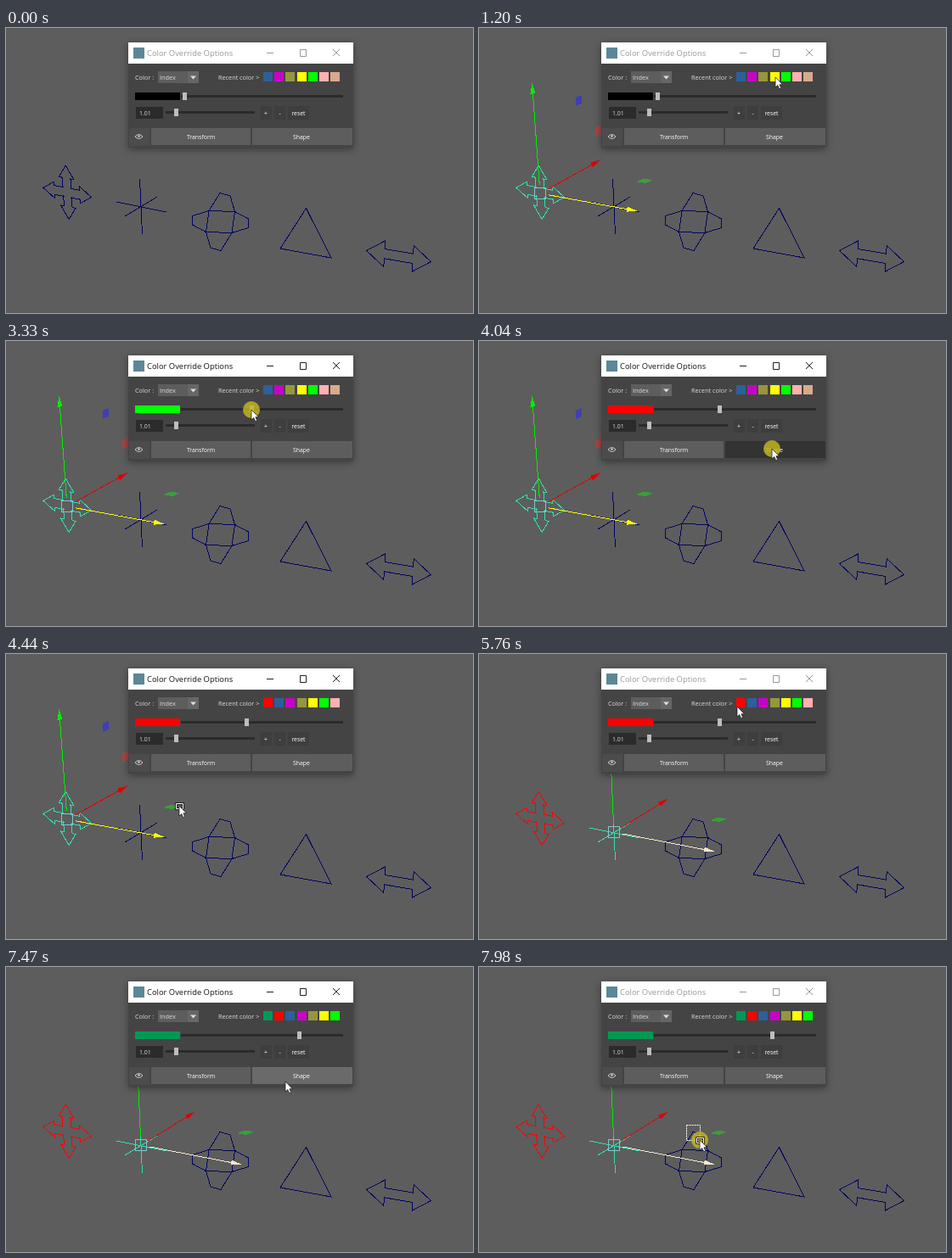
These frames come from a looping animation (550 by 336 pixels, 8 s). An HTML page:

```html
<!DOCTYPE html>
<html lang="en">
<head>
<meta charset="utf-8">
<title>Color Override Options</title>
<style>
html, body { margin: 0; width: 100%; height: 100%; overflow: hidden; background: #5d5d5d; }
svg { display: block; width: 550px; height: 336px; font: 7.3px "Open Sans", "Noto Sans", sans-serif; }
#scene, #win rect { shape-rendering: crispEdges; }
#controls path { fill: none; stroke: #000460; }
#win { filter: drop-shadow(0 2px 4px rgba(0, 0, 0, .4)); }
#win text { fill: #ddd; }
#win #title { font-size: 9.4px; }
#win .mid { text-anchor: middle; font-size: 6.9px; fill: #fff; }
.btn { fill: #5d5d5d; }
.small { fill: #3e3e3e; }
.dark { fill: #2b2b2b; }
.knob { fill: #bdbdbd; }
</style>
</head>
<body>
<svg viewBox="0 0 550 336">
  <rect width="550" height="336" fill="#5d5d5d"/>
  <g id="scene"><g id="controls"></g><g id="gizmo"></g></g>
  <g id="win">
    <rect x="144" y="17" width="265" height="124" fill="#444"/>
    <rect x="144" y="17" width="265" height="25" fill="#fff"/>
    <rect x="150" y="23" width="13" height="13" fill="#5b8798"/>
    <text id="title" x="166" y="33">Color Override Options</text>
    <path id="sysButtons" d="M307 29.500H315M346.500 25.500h7v8h-7zM385 25l8 8m0-8l-8 8" fill="none"/>
    <text x="152" y="61">Color :</text>
    <rect class="btn" x="179" y="51" width="48" height="14"/>
    <rect x="214" y="51" width="13" height="14" fill="#666"/>
    <path d="M217 56.500h7l-3.500 4z" fill="#ddd"/>
    <text x="181" y="61">Index</text>
    <text x="250" y="60.500">Recent color &gt;</text>
    <g id="recent"></g>
    <rect class="dark" x="206" y="79" width="191" height="3"/>
    <rect id="chip" x="152" y="76" width="53" height="9"/>
    <rect id="knob" class="knob" y="76" width="5" height="9"/>
    <rect class="dark" x="153" y="93" width="32" height="14"/>
    <text x="157" y="103" font-size="7">1.01</text>
    <rect class="dark" x="188" y="98" width="105" height="3"/>
    <rect class="knob" x="198" y="95" width="5" height="9"/>
    <rect class="small" x="300" y="92" width="13" height="16"/><text class="mid" x="306" y="102.500">+</text>
    <rect class="small" x="316" y="92" width="13" height="16"/><text class="mid" x="322.500" y="102.500">-</text>
    <rect class="small" x="332" y="92" width="25" height="16"/><text class="mid" x="344.500" y="102.500">reset</text>
    <rect x="145" y="118" width="24" height="21" fill="#4c4c4c"/>
    <path d="M152 128q4.500-5 9 0-4.500 5-9 0z" fill="none" stroke="#ccc"/><circle cx="156.500" cy="127.500" r="1.200" fill="#ccc"/>
    <rect class="btn" x="171" y="118" width="117" height="20"/><text class="mid" x="229.500" y="131">Transform</text>
    <rect id="shape" x="290" y="118" width="118" height="20"/><text class="mid" x="348" y="131">Shape</text>
  </g>
  <rect id="marquee" fill="none" stroke="#fff" stroke-dasharray="2 1"/>
  <g id="cursor">
    <circle id="press" r="10" fill="#c4b820" fill-opacity=".82"/>
    <g id="pickBox" fill="none"><path d="M-3.500-2.500h8v6h-8z" stroke="#111" stroke-width="2.500"/><path d="M-3.500-2.500h8v6h-8z" stroke="#fff"/></g>
    <path d="M0 0v12l2.800-2.500 1.900 4.200 2-.9-1.800-4.100h3.600z" fill="#fff" stroke="#111" stroke-width=".7"/>
  </g>
</svg>
<script>
const $ = id => document.getElementById(id);
const set = (id, attrs) => { for (const a in attrs) $(id).setAttribute(a, attrs[a]); };
const show = (id, on) => set(id, { visibility: on ? "visible" : "hidden" });
const poly = points => "M" + points.map(p => p.join(" ")).join("L") + "Z";

const LOOP = 8000, STEP = 100.9;
const palette = ("#000 #404040 #999 #9b0028 #000460 #00f #004619 #260043 #c800c8 #8a4833 #3f231f #992600 " +
  "#f00 #0f0 #004199 #fff #ff0 #64dcff #43ffa3 #ffb0b0 #e4ac79 #ffff63 #009954").split(" ");
const firstRecent = "#2d5f9b #c800c8 #96963c #ff0 #0f0 #ffb0b0 #d8aa8c".split(" ");

// Cursor stops: tick, x, y and what the pressed button does until the next stop.
const stops = [
  [2, 385, 190], [6, 5, 215, "marquee"], [9, 66, 193, "marquee"], [10, 66, 193], [12, 349, 58],
  [19, 210, 81, "slide"], [26, 289, 81, "slide"], [33, 289, 81, "slide"], [36, 283, 82, "slide"], [38, 300, 95],
  [40, 345, 127, "click"], [42, 335, 127], [44, 204, 179], [47, 157, 187],
  [49, 157, 187, "marquee"], [53, 178, 213, "marquee"], [54, 178, 213], [57, 304, 62],
  [59, 281, 80, "slide"], [65, 341, 83, "slide"], [69, 341, 83],
  [72, 348, 127, "click"], [73, 345, 127], [77, 244, 180], [78, 244, 186, "marquee"], [79, 260, 204, "marquee"]
];

// One arm, mirrored across its axis, is turned to each side and placed along the axes u and v.
function arrows(cx, cy, u, v, arms, shape) {
  const arm = [...shape, [1, 0], ...shape.map(([a, b]) => [a, -b]).reverse()];
  const points = [];
  for (let i = 0; i < arms; i++) {
    const turn = 2 * Math.PI * i / arms, c = Math.cos(turn), s = Math.sin(turn);
    for (const [a, b] of arm) {
      const p = a * c - b * s, q = a * s + b * c;
      points.push([cx + p * u[0] + q * v[0], cy + p * u[1] + q * v[1]]);
    }
  }
  return poly(points);
}

function gem(cx, cy) {
  const half = [[-.5, -34], [11.500, -30.500], [17, -12], [33, -3.500], [33, 7], [13.500, 13]];
  const ring = [...half, ...half.map(([x, y]) => [-x, -y])].map(([x, y]) => [cx + x, cy + y]);
  return poly(ring) + poly([2, 5, 8, 11].map(i => ring[i]));
}

function axis(ox, oy, tx, ty, color) {
  const len = Math.hypot(tx - ox, ty - oy), dx = (tx - ox) / len, dy = (ty - oy) / len;
  const bx = tx - 13 * dx, by = ty - 13 * dy;
  const head = poly([[tx, ty], [bx - 3 * dy, by + 3 * dx], [bx + 3 * dy, by - 3 * dx]]);
  return `<path d="M${ox + 10 * dx} ${oy + 10 * dy}L${bx} ${by}" stroke="${color}"/><path d="${head}" fill="${color}"/>`;
}

const gizmo = (x, y, up, side, front, color) =>
  axis(x, y, ...up, "#0e0") + axis(x, y, ...side, "#d00") + axis(x, y, ...front, color) +
  `<g transform="translate(${x} ${y})">
    <path d="M42-113l7-3v10l-7 3z" fill="#3f3fb4"/><path d="M65-77l10-6v10l-10 6z" fill="#a84444"/>
    <path d="M115-14l7-3 9 1.500-7 3z" fill="#38a038" stroke="#38a038"/>
    <path d="M-6.500-6.500h13v13h-13z" fill="none" stroke="#7cc8d0"/></g>`;

const gizmos = ["",
  gizmo(72, 195, [62.500, 64.500], [144, 155], [187, 216], "#ff0"),
  gizmo(159, 210, [154, 100], [224, 170], [278, 233], "#f8e6d0")];

$("controls").innerHTML = [
  arrows(72.200, 193.900, [28.300, 5.500], [2, 31.700], 4, [[.16, -.17], [.53, -.17], [.53, -.31]]),
  "M157.500 178L160.500 243M130 205L189 217M140 222L178 199",
  gem(252.500, 228.500),
  "M353.500 212.500L383 271 323 260Z",
  arrows(462.500, 269, [38, 6.500], [-1, 15.300], 2, [[.44, -.37], [.44, -1]])
].map(d => `<path d="${d}"/>`).join("");
$("recent").innerHTML = firstRecent.map((_, i) =>
  `<rect x="${Math.round(303 + 13.2 * i)}" y="52" width="11" height="11"/>`).join("");

function cursorAt(tick) {
  const i = stops.findIndex(s => s[0] > tick);
  const b = stops.at(i), a = stops[Math.max(i < 0 ? stops.length - 1 : i - 1, 0)];
  const f = b === a ? 0 : Math.max(0, (tick - a[0]) / (b[0] - a[0])), ease = f * f * (3 - 2 * f);
  return [1, 2].map(n => Math.round(a[n] + (b[n] - a[n]) * ease));
}

const indexAt = x => Math.round((x - 208) / 6.1) + 1;

// Replays the actions so far: marquees select the next control, clicks apply the colour.
function stateAt(tick) {
  const s = { selected: 0, index: 1, recent: firstRecent, painted: [], active: false };
  for (const [start, x, y, action] of stops.filter(stop => stop[0] <= tick)) {
    if (s.action === "marquee" && !action) s.selected++;
    if (s.action === "click") {
      s.painted[s.selected] = palette[s.index - 1];
      s.recent = [palette[s.index - 1], ...s.recent];
    }
    if (action === "marquee" && s.action !== action) s.corner = [x, y];
    if (action === "slide") s.index = indexAt(cursorAt(tick)[0]);
    if (s.action === "slide" && !action) s.index = indexAt(s.x);
    if (action) s.active = action !== "marquee";
    s.action = action;
    s.x = x;
  }
  return s;
}

function draw(tick) {
  const [x, y] = cursorAt(tick), s = stateAt(tick);
  const overShape = x > 290 && x < 408 && y > 118 && y < 138;
  const overWindow = x > 143 && x < 410 && y > 17 && y < 142;

  [...$("controls").children].forEach((path, i) => {
    path.style.stroke = i + 1 === s.selected ? "#30e0b0" : s.painted[i + 1] || "";
  });
  if ($("gizmo").dataset.of != s.selected) {
    $("gizmo").dataset.of = s.selected;
    $("gizmo").innerHTML = gizmos[s.selected];
  }

  $("title").style.fill = s.active ? "#111" : "#999";
  set("sysButtons", { stroke: s.active ? "#222" : "#999" });
  [...$("recent").children].forEach((r, i) => r.setAttribute("fill", s.recent[i]));
  set("chip", { fill: palette[s.index - 1] });
  set("knob", { x: Math.round(207.5 + 6.15 * (s.index - 1)) });
  set("shape", { fill: !overShape ? "#5d5d5d" : s.action ? "#333" : "#6a6a6a" });

  show("marquee", s.action === "marquee");
  if (s.action === "marquee") {
    const [cx, cy] = s.corner;
    set("marquee", { x: Math.min(x, cx) + .5, y: Math.min(y, cy) + .5, width: Math.abs(x - cx), height: Math.abs(y - cy) });
  }
  const visible = tick >= stops[0][0];
  show("cursor", visible);
  show("press", visible && s.action);
  show("pickBox", visible && !overWindow);
  set("cursor", { transform: `translate(${x} ${y})` });
}

function frame() {
  draw(Math.floor((performance.now() % LOOP + 12) / STEP));
  requestAnimationFrame(frame);
}
frame();
</script>
</body>
</html>
```
